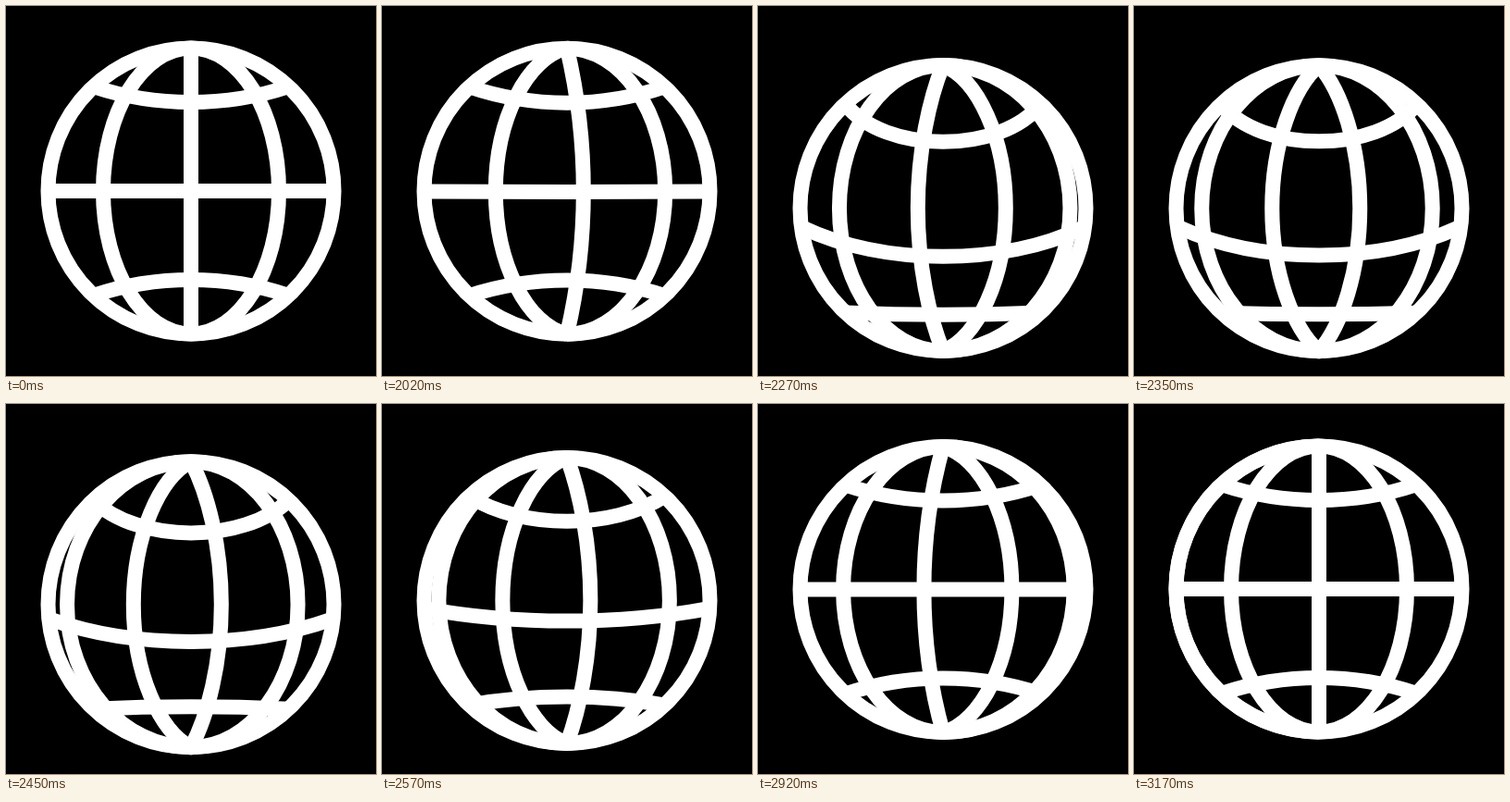
Animation, 400 px wide and 400 px high, one loop 3.2 s. Source, as an HTML page with a canvas:

```html
<!DOCTYPE html>
<html>
<head>
<meta charset="utf-8">
<style>
html, body { margin: 0; width: 100%; height: 100%; overflow: hidden; background: #000; }
canvas { display: block; width: 100vw; height: 100vh; }
</style>
</head>
<body>
<canvas id="stage" width="400" height="400"></canvas>
<script>
const ctx = document.getElementById('stage').getContext('2d');
const LOOP = 3200, R = 154.5, LINE = 16, KAPPA = 0.552;

// Resting places of the meridians; each one travels to the next place.
const SIDE = 95;
const STATIONS = [-R, -SIDE, 0, SIDE, R];

// Spin in stations travelled: [time, value]
const SPIN = [[1995, 0], [2020, 0.18], [2270, 2.704], [2450, 4.337],
              [2570, 5.26], [2770, 6.327], [3170, 7]];

const mix = (a, b, f) => a + (b - a) * f;

const smooth = (a, b, t) => {
  const s = Math.min(1, Math.max(0, (t - a) / (b - a)));
  return s * s * (3 - 2 * s);
};

const bump = (start, peak, end, t) => smooth(start, peak, t) * (1 - smooth(peak, end, t));

function slope(keys, i) {
  if (i === 0 || i === keys.length - 1) return i === 0 ? 0.007 : 0;
  const [[t0, v0], [t1, v1], [t2, v2]] = keys.slice(i - 1, i + 2);
  const h0 = t1 - t0, h1 = t2 - t1;
  return ((v1 - v0) / h0 * h1 + (v2 - v1) / h1 * h0) / (h0 + h1);
}

function curve(keys, t) {
  const last = keys.length - 1;
  if (t <= keys[0][0]) return keys[0][1];
  if (t >= keys[last][0]) return keys[last][1];
  const i = keys.findIndex(k => k[0] > t) - 1;
  const [t0, v0] = keys[i], [t1, v1] = keys[i + 1];
  const h = t1 - t0, f = (t - t0) / h, g = 1 - f;
  return v0 + (v1 - v0) * f * f * (3 - 2 * f)
    + h * f * g * (slope(keys, i) * g - slope(keys, i + 1) * f);
}

// Morphs from a straight line in the middle to a half ellipse at the sides.
function meridian(x) {
  const bend = Math.min(1, Math.abs(x) / SIDE);
  const poleY = mix(R * 2 / 3, R, bend);
  const midY = mix(R / 3, R * KAPPA, bend);
  ctx.beginPath();
  ctx.moveTo(0, -R);
  ctx.bezierCurveTo(x * KAPPA, -poleY, x, -midY, x, 0);
  ctx.bezierCurveTo(x, midY, x * KAPPA, poleY, 0, R);
  ctx.stroke();
}

function parallel(halfWidth, endY, midY, roundness) {
  const handleX = halfWidth * roundness;
  const handleY = (4 * midY - endY) / 3;
  ctx.beginPath();
  ctx.moveTo(-halfWidth, endY);
  ctx.bezierCurveTo(-handleX, handleY, handleX, handleY, halfWidth, endY);
  ctx.stroke();
}

function draw(t) {
  const spin = curve(SPIN, t);
  const part = spin % 1;
  const lean = bump(2000, 2290, 2795, t);
  const tilt = 53 * lean;
  const drop = 19 * bump(2000, 2300, 2990, t);

  ctx.fillStyle = '#000';
  ctx.fillRect(0, 0, 400, 400);
  ctx.save();
  ctx.translate(200, 200 + drop);
  ctx.strokeStyle = '#fff';
  ctx.lineWidth = LINE;

  ctx.beginPath();
  ctx.arc(0, 0, R, 0, 2 * Math.PI);
  ctx.stroke();

  for (let i = spin < 0.2 ? 1 : 0; i < 4; i++) {
    meridian(mix(STATIONS[i], STATIONS[i + 1], part));
  }

  parallel(106, -113, -96 + 0.465 * tilt, 0.36 + 0.24 * lean);
  parallel(152, 0.4 * tilt, tilt, 0.34 + 0.08 * lean);
  parallel(106, 113, 96 + 0.365 * tilt, 0.36);
  ctx.restore();
}

const begin = performance.now();
function tick() {
  draw((performance.now() - begin) % LOOP);
  requestAnimationFrame(tick);
}
tick();
</script>
</body>
</html>
```
